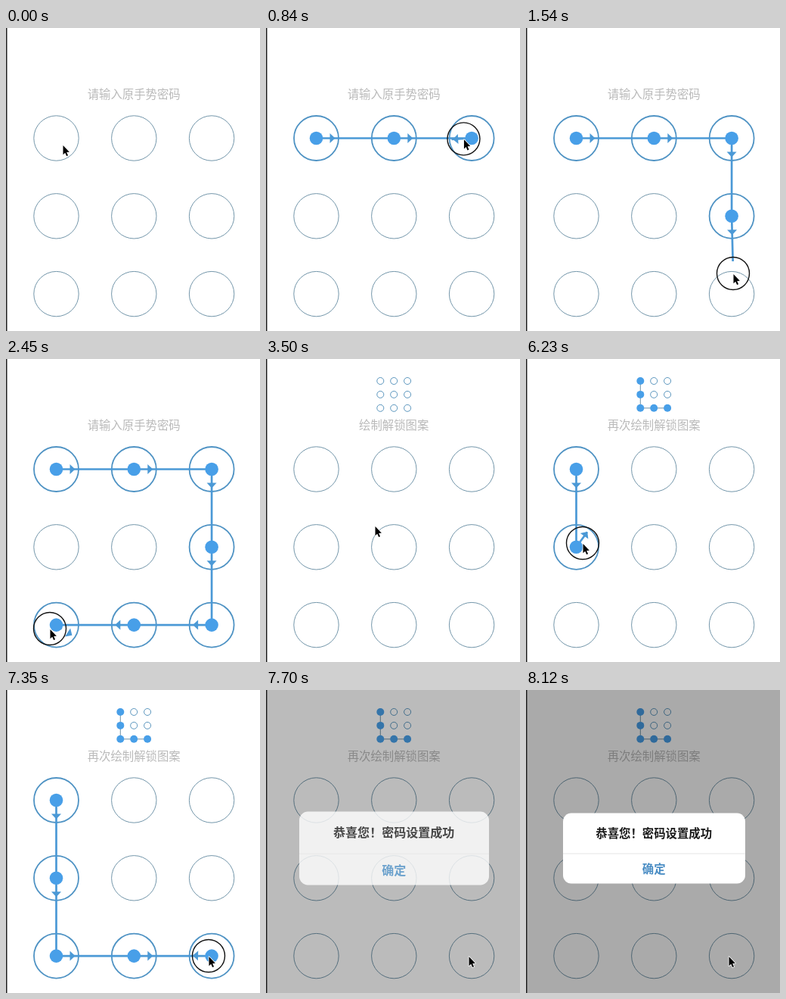
An HTML page with a canvas that plays this animation: 336x400 px, repeating every 8.19 s.

```html
<!DOCTYPE html>
<html lang="zh-CN">
<head>
<meta charset="utf-8">
<style>
html, body { margin: 0; width: 336px; height: 400px; overflow: hidden; background: #fff; }
canvas { display: block; width: 336px; height: 400px; }
</style>
</head>
<body>
<canvas id="stage"></canvas>
<script>
const canvas = document.getElementById('stage');
const ratio = window.devicePixelRatio || 1;
canvas.width = 336 * ratio;
canvas.height = 400 * ratio;
const ctx = canvas.getContext('2d');
ctx.scale(ratio, ratio);

const LOOP = 8190, STEP = 70, LAG = 60, HOLD = 60;
const BLUE = '#489fe8', LINE = '#4b99d6', LIT_RING = '#4f93c4', RING = '#7396aa';
const FONT = '"Noto Sans CJK SC", "Noto Sans CJK", "Noto Sans SC", sans-serif';

// Pointer moves at constant speed; those with a reset time draw a pattern
const moves = [
  { start: 140, end: 2510, reset: 2590, points: [[75, 154], [270, 146], [274, 324], [268, 356], [42, 356]] },
  { start: 2590, end: 3220, points: [[42, 356], [144, 220]] },
  { start: 3500, end: 3870, points: [[144, 220], [66, 150]] },
  { start: 3940, end: 4955, reset: 5250, points: [[66, 150], [68, 345], [169, 352], [256, 337], [276, 345]] },
  { start: 5300, end: 5850, points: [[276, 345], [66, 150]] },
  { start: 5890, end: 7290, reset: 7490, points: [[66, 150], [82, 234], [75, 243], [68, 345], [268, 351]] }
];
const gestures = moves.filter(m => m.reset);
const [verify, create] = gestures;

const clamp = k => Math.max(0, Math.min(1, k));
const dist = (a, b) => Math.hypot(b[0] - a[0], b[1] - a[1]);
const mix = (a, b, k) => a.map((v, i) => v + (b[i] - v) * k);
const released = g => g.reset - HOLD;

const grid = (x, y, gap) =>
  Array.from({ length: 9 }, (_, i) => [x + i % 3 * gap, y + Math.floor(i / 3) * gap]);
const nodes = grid(66.5, 145.5, 102.8);
const minis = grid(151.3, 29, 17.9);

// Point at fraction k of a polyline's length
function along(points, k) {
  const parts = points.slice(1).map((p, i) => dist(points[i], p));
  let left = k * parts.reduce((a, b) => a + b);
  let i = 0;
  while (i < parts.length - 1 && left > parts[i]) left -= parts[i++];
  return mix(points[i], points[i + 1], clamp(left / parts[i]));
}

function pointer(t) {
  const m = moves.findLast(m => t >= m.start) || moves[0];
  return along(m.points, clamp((t - m.start) / (m.end - m.start)));
}

// Nodes the gesture has touched by time t, in order
function touched(g, t) {
  const hit = new Set();
  for (let s = g.start; s <= Math.min(t - LAG, g.end); s += 10) {
    const n = nodes.findIndex(p => dist(p, pointer(s)) < 30);
    if (n >= 0) hit.add(n);
  }
  return [...hit];
}

function circle([x, y], r, stroke, width, fill) {
  ctx.beginPath();
  ctx.arc(x, y, r, 0, Math.PI * 2);
  if (fill) { ctx.fillStyle = fill; ctx.fill(); }
  if (stroke) { ctx.strokeStyle = stroke; ctx.lineWidth = width; ctx.stroke(); }
}

function polyline(points, color, width) {
  ctx.beginPath();
  points.forEach(p => ctx.lineTo(...p));
  ctx.strokeStyle = color;
  ctx.lineWidth = width;
  ctx.lineJoin = 'round';
  ctx.stroke();
}

function arrow(from, to) {
  ctx.save();
  ctx.translate(...from);
  ctx.rotate(Math.atan2(to[1] - from[1], to[0] - from[0]));
  ctx.beginPath();
  ctx.moveTo(25, 0);
  ctx.lineTo(18, -6.5);
  ctx.lineTo(18, 6.5);
  ctx.fillStyle = LINE;
  ctx.fill();
  ctx.restore();
}

function label(str, y, color, weight) {
  ctx.font = `${weight} 15.4px ${FONT}`;
  ctx.textAlign = 'center';
  ctx.fillStyle = color;
  ctx.fillText(str, 169.2, y);
}

function drawLock(t) {
  const g = gestures.find(g => t >= g.start && t < g.reset);
  const lit = g ? touched(g, t) : [];
  const trail = lit.map(n => nodes[n]);
  if (lit.length && t < released(g)) trail.push(pointer(t - LAG));
  nodes.forEach((p, n) => lit.includes(n) ? circle(p, 29.5, LIT_RING, 1.8) : circle(p, 29.7, RING, 1));
  polyline(trail, LINE, 2.7);
  lit.forEach((n, i) => {
    circle(nodes[n], 8.8, null, 0, BLUE);
    if (trail[i + 1]) arrow(nodes[n], trail[i + 1]);
  });
}

function drawPreview(t) {
  const lit = touched(create, t);
  polyline(lit.map(n => minis[n]), '#6f91a6', 1);
  minis.forEach((p, n) => lit.includes(n) ? circle(p, 5, null, 0, BLUE) : circle(p, 4.5, '#5b96be', 1));
}

function drawAlert(t) {
  const k = clamp((t - 7500) / 490);
  if (!k) return;
  const ease = 1 - (1 - k) ** 3;
  const size = 1.2 - 0.2 * ease;
  ctx.fillStyle = `rgba(0,0,0,${0.335 * ease})`;
  ctx.fillRect(0, 0, 336, 400);
  ctx.save();
  ctx.globalAlpha = ease;
  ctx.translate(169.5, 209);
  ctx.scale(size, size);
  ctx.translate(-169.5, -209);
  ctx.beginPath();
  ctx.roundRect(49, 162.5, 241, 93, 11);
  ctx.fillStyle = '#fff';
  ctx.fill();
  ctx.fillStyle = '#e6e6e6';
  ctx.fillRect(49, 215.5, 241, 1);
  label('恭喜您！密码设置成功', 195, '#1a1a1a', 700);
  label('确定', 242.2, '#4a8dc4', 700);
  ctx.restore();
}

function drawPointer(t) {
  const [x, y] = pointer(t);
  if (gestures.some(g => t >= g.start && t < released(g))) circle([x, y], 21.5, '#111', 1.4);
  ctx.save();
  ctx.translate(x + 0.5, y + 1);
  ctx.scale(0.9, 0.9);
  ctx.beginPath();
  [[0, 0], [0, 13.5], [3, 10.8], [5.1, 15.6], [7.3, 14.7], [5.2, 10], [9.3, 9.7]]
    .forEach(p => ctx.lineTo(...p));
  ctx.closePath();
  ctx.strokeStyle = '#fff';
  ctx.lineWidth = 1.8;
  ctx.stroke();
  ctx.fillStyle = '#000';
  ctx.fill();
  ctx.restore();
}

function draw(t) {
  ctx.fillStyle = '#fff';
  ctx.fillRect(0, 0, 336, 400);
  if (t >= verify.reset) drawPreview(t);
  const title = t < verify.reset ? '请输入原手势密码'
    : t < create.reset ? '绘制解锁图案' : '再次绘制解锁图案';
  label(title, 92.8, '#bababa', 400);
  drawLock(t);
  drawAlert(t);
  ctx.fillStyle = '#222';
  ctx.fillRect(0, 0, 1.5, 400);
  drawPointer(t);
}

function tick() {
  const t = performance.now() % LOOP;
  draw(Math.floor(t / STEP) * STEP);
  requestAnimationFrame(tick);
}
tick();
</script>
</body>
</html>
```
